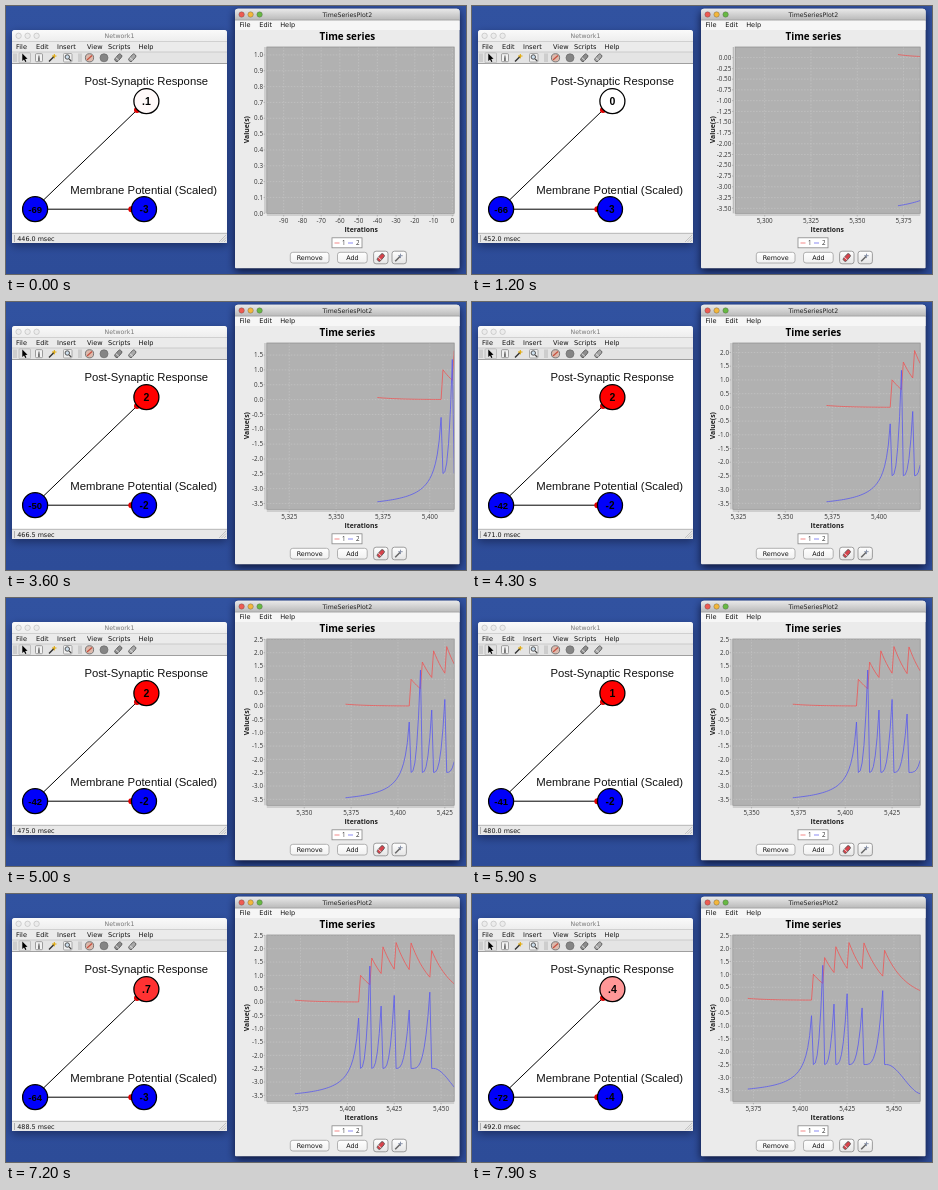
Write an HTML page with a canvas that moves like this. It is 460 px wide and 268 px high and loops after 8000 ms.

```html
<!DOCTYPE html>
<html lang="en">
<head>
<meta charset="utf-8">
<title>Spiking network</title>
<style>
html, body { margin: 0; width: 100%; height: 100%; overflow: hidden; background: #2f4f9c; }
canvas { display: block; width: 460px; height: 268px; }
</style>
</head>
<body>
<canvas id="stage"></canvas>
<script>
const W = 460, H = 268, LOOP = 8000, STEP = 100;
const cv = document.getElementById('stage');
const g = cv.getContext('2d');
const dpr = window.devicePixelRatio || 1;
cv.width = W * dpr;
cv.height = H * dpr;

const UI = '"DejaVu Sans", sans-serif';
const CHART = '"Open Sans", "Noto Sans", sans-serif';
const ARIAL = '"Liberation Sans", Arial, sans-serif';
const RED = '#ee5656', BLUE = '#5a5aee';

// Simulated msec at key times; two iterations pass per msec
const TIMES = [0, 2400, 3600, 5000, 5900, 7200, 7900];
const MSEC = [446, 458, 466.5, 475, 480, 488.5, 492];

// Spikes: iteration and peak of the scaled potential
const SPIKES = [[5406, -0.6], [5412, 1.35], [5418, -0.15], [5425, 0.25], [5433, -0.3], [5444, 0.37]];
const FIRST = 5372, LAST = 5464, RESET = -2.49, DECAY = 0.917;

function clock(t) {
  let k = 1;
  while (k < TIMES.length - 1 && t > TIMES[k]) k++;
  const u = Math.min(1, (t - TIMES[k - 1]) / (TIMES[k] - TIMES[k - 1]));
  return Math.round((MSEC[k - 1] + (MSEC[k] - MSEC[k - 1]) * u) * 2) / 2;
}
const iteration = msec => Math.min(LAST, msec * 2 + 4480);

function potential(i) {
  if (i <= SPIKES[0][0]) return -3.69 + 9.27 / (SPIKES[0][0] + 3 - i);
  for (let k = 1; k < SPIKES.length; k++) {
    const [end, peak] = SPIKES[k];
    if (i > end) continue;
    const start = SPIKES[k - 1][0] + 1, n = end - start;
    return RESET + (peak - RESET) * Math.pow((i - start) / n, 1.6 + 0.2 * n);
  }
  const u = Math.max(0, Math.min(1, (i - 5446) / 19));
  return RESET - 1.14 * u * u * (3 - 2 * u);
}

const blue = [], red = [];
for (let i = FIRST, v = 0.07; i <= LAST; i++) {
  if (i > FIRST) v = SPIKES.some(s => s[0] + 1 === i) ? v + 1 : v * DECAY;
  red.push(v);
  blue.push(potential(i));
}

// Drawing helpers
function text(s, x, y, size, family, opt = {}) {
  g.font = (opt.bold ? 'bold ' : '') + size + 'px ' + family;
  g.textAlign = opt.align || 'left';
  g.fillStyle = opt.color || '#111';
  g.fillText(s, x, y);
}
function box(x, y, w, h, fill) {
  g.fillStyle = fill;
  g.fillRect(x, y, w, h);
}
function line(x1, y1, x2, y2, color, width = 1) {
  g.strokeStyle = color;
  g.lineWidth = width;
  g.beginPath();
  g.moveTo(x1, y1);
  g.lineTo(x2, y2);
  g.stroke();
}
function disc(x, y, r, fill, stroke, width = 1) {
  g.beginPath();
  g.arc(x, y, r, 0, Math.PI * 2);
  g.fillStyle = fill;
  g.fill();
  if (stroke) {
    g.strokeStyle = stroke;
    g.lineWidth = width;
    g.stroke();
  }
}
function round(x, y, w, h, r, fill, stroke) {
  g.beginPath();
  g.roundRect(x, y, w, h, r);
  g.fillStyle = fill;
  g.fill();
  if (stroke) {
    g.strokeStyle = stroke;
    g.lineWidth = 0.8;
    g.stroke();
  }
}
function shade(y1, y2, a, b) {
  const gr = g.createLinearGradient(0, y1, 0, y2);
  gr.addColorStop(0, a);
  gr.addColorStop(1, b);
  return gr;
}
function poly(points, fill) {
  g.beginPath();
  points.forEach(([x, y]) => g.lineTo(x, y));
  g.closePath();
  g.fillStyle = fill;
  g.fill();
}
function frame(x, y, w, h, title, lights, tint, rim, depth) {
  g.save();
  g.shadowColor = `rgba(0,0,20,${depth})`;
  g.shadowBlur = 8 * dpr;
  g.shadowOffsetY = 3 * dpr;
  round(x, y, w, h, [3, 3, 1, 1], '#ebebeb');
  g.restore();
  round(x, y, w, 11.5, [3, 3, 0, 0], shade(y, y + 11.5, tint[0], tint[1]));
  line(x, y + 11.5, x + w, y + 11.5, tint[2], 0.7);
  lights.forEach((c, k) => disc(x + 6.6 + k * 9, y + 5.8, 2.7, c, rim, 0.6));
  text(title, x + w / 2, y + 8.1, 6.2, UI, { align: 'center', color: tint[3] });
}
function menu(items, y) {
  items.forEach(([s, x]) => text(s, x, y, 6.55, UI));
}
function eraser(x, y, color) {
  g.save();
  g.translate(x, y);
  g.rotate(-0.85);
  round(-4.2, -2, 8.4, 4, 1.6, color, '#555');
  line(-1.5, -2, -1.5, 2, '#eee', 0.8);
  g.restore();
}
function wand(x, y, stick, star) {
  line(x - 3.5, y + 3.5, x + 1.5, y - 1.5, stick, 1.5);
  line(x - 0.5, y - 2, x + 4, y - 2, star, 1);
  line(x + 1.8, y - 4, x + 1.8, y + 0.4, star, 1);
}

function toolbar() {
  box(6, 46, 215, 11.5, '#e4e4e4');
  line(6, 46, 221, 46, '#bdbdbd', 0.7);
  line(6, 57.5, 221, 57.5, '#8d8d8d', 0.8);
  for (const x of [8, 10, 73, 75]) line(x, 47.5, x, 56, '#a5a5a5', 0.7);
  round(13, 46.8, 11.5, 10, 1, '#e0e0e0', '#b5b5b5');
  poly([[16.3, 47.5], [16.3, 55], [18, 53.5], [19.3, 56], [20.4, 55.4], [19.2, 53], [21.5, 52.8]], '#000');
  round(29.5, 47.7, 7, 8, 1, '#f2f2f2', '#888');
  text('i', 33, 54.5, 7, UI, { bold: true, align: 'center', color: '#333' });
  wand(46.5, 52, '#333', '#e2a800');
  round(57.5, 47.5, 8.5, 8.5, 1, '#efefef', '#999');
  disc(61.3, 51, 2.2, '#cfe0ee', '#444', 0.9);
  line(63, 52.8, 65.2, 55, '#444', 1.2);
  disc(83.5, 51.8, 4.1, '#dcb9ac', '#6f6f6f', 0.9);
  line(81, 54, 86, 49.5, '#c7503f', 1.2);
  disc(98, 51.8, 4, '#858585', '#6b6b6b', 0.7);
  eraser(112.3, 51.8, '#8d8d8d');
  eraser(126.3, 51.8, '#a9a9a9');
}

function label(v) {
  if (Math.abs(v) >= 0.95) return String(Math.round(v));
  const s = v.toFixed(1).replace('0.', '.');
  return s === '.0' || s === '-.0' ? '0' : s;
}
function node(x, y, fill, s, size) {
  disc(x, y, 12.5, fill, '#000', 1.3);
  text(s, x, y + 3.8, size, ARIAL, { bold: true, align: 'center', color: '#000' });
}

function network(msec) {
  frame(6, 24, 215, 213, 'Network1', ['#ececec', '#ececec', '#ececec'],
    ['#fafafa', '#ededed', '#c4c4c4', '#777'], '#b9b9b9', 0.4);
  menu([['File', 10], ['Edit', 30], ['Insert', 51], ['View', 81], ['Scripts', 102], ['Help', 132.5]], 43);
  toolbar();
  box(6, 58, 215, 169, '#fff');

  const k = iteration(msec) - FIRST;
  const v = red[k], p = blue[k];
  const pale = Math.round(255 * (1 - Math.max(0, Math.min(1, (v - 0.05) * 1.27))));

  text('Post-Synaptic Response', 78.4, 79, 11.3, ARIAL);
  text('Membrane Potential (Scaled)', 64.2, 187.5, 11.35, ARIAL);
  line(37, 194.5, 131, 104, '#000', 1);
  line(41, 203.2, 126, 203.2, '#000', 1);
  disc(131, 104, 3, '#e00000');
  disc(125.3, 203.2, 3, '#e00000');
  node(140.4, 95.2, `rgb(255,${pale},${pale})`, label(v), 10.5);
  node(29.1, 203.2, '#0000fa', String(Math.round(p * 20)), 9.5);
  node(138, 203.2, '#0000fa', label(p), 10);

  box(6, 227, 215, 10, '#e8e8e8');
  line(6, 227.3, 221, 227.3, '#aaa', 0.8);
  line(8.5, 229, 8.5, 236, '#999', 0.7);
  text(msec.toFixed(1) + ' msec', 11.3, 234.6, 6.4, UI);
  for (let n = 0; n < 3; n++) line(213 + n * 2.5, 236, 220, 229 + n * 2.5, '#aaa', 0.6);
}

const TOP = 41, BOTTOM = 207.3, EDGE = 448.2;

function chart(msec, empty) {
  let lo = 0, hi = 1.05, right = 1, unit = 0.1, xUnit = 10, count = 0;
  const h = BOTTOM - TOP;
  if (!empty) {
    right = iteration(msec);
    count = right - FIRST + 1;
    const all = red.slice(0, count).concat(blue.slice(0, count));
    const min = Math.min(...all), max = Math.max(...all), pad = (max - min) * 0.05;
    lo = min - pad;
    hi = max + pad;
    unit = 0.25 * h / (hi - lo) >= 9 ? 0.25 : 0.5;
    xUnit = 25;
  }
  // Longer tick labels push the plot's left side inwards
  const digits = unit === 0.25 ? 2 : 1;
  const x0 = 258.5 + digits * 2.3, w = EDGE - x0, left = right - 100;
  const px = i => x0 + (i - left) / 100 * w;
  const py = v => TOP + (hi - v) / (hi - lo) * h;

  box(x0, TOP, w, h, '#b1b1b1');
  line(x0 - 1.8, TOP, x0 - 1.8, BOTTOM, '#999', 0.7);
  line(x0, 209, EDGE, 209, '#999', 0.7);

  for (let k = Math.ceil(lo / unit - 1e-9); k * unit <= hi; k++) {
    const y = py(k * unit);
    g.setLineDash([1.5, 1.5]);
    line(x0, y, EDGE, y, '#cbcbcb', 0.5);
    g.setLineDash([]);
    line(x0 - 3.2, y, x0 - 1.8, y, '#999', 0.6);
    text((k * unit).toFixed(digits), x0 - 3.8, y + 2.2, 6.3, CHART, { align: 'right', color: '#333' });
  }
  for (let i = Math.ceil(left / xUnit) * xUnit; i <= right; i += xUnit) {
    const x = px(i);
    g.setLineDash([1.5, 1.5]);
    line(x, TOP, x, BOTTOM, '#cbcbcb', 0.5);
    g.setLineDash([]);
    line(x, 209, x, 210.4, '#999', 0.6);
    text(i.toLocaleString('en-US'), x, 217, 6.3, CHART, { align: 'center', color: '#333' });
  }

  g.save();
  g.beginPath();
  g.rect(x0, TOP, w, h);
  g.clip();
  for (const [data, color] of [[red, RED], [blue, BLUE]]) {
    g.beginPath();
    for (let k = 0; k < count; k++) g.lineTo(px(FIRST + k), py(data[k]));
    g.strokeStyle = color;
    g.lineWidth = 0.8;
    g.lineJoin = 'bevel';
    g.stroke();
  }
  g.restore();
  g.strokeStyle = '#8c8c8c';
  g.lineWidth = 0.7;
  g.strokeRect(x0, TOP, w, h);
}

function button(s, x, w) {
  round(x, 246.3, w, 10.7, 2.5, shade(246, 257, '#fff', '#f0f0f0'), '#a0a0a0');
  text(s, x + w / 2, 254.1, 6.4, UI, { align: 'center' });
}

function plotWindow(msec, empty) {
  frame(229, 2.7, 224.6, 259.6, 'TimeSeriesPlot2', ['#ee5b52', '#f3b73c', '#68b944'],
    ['#e9e9e9', '#b9b9b9', '#888', '#222'], 'rgba(70,70,70,.55)', 0.75);
  box(229, 14.6, 224.6, 9.4, '#f6f6f6');
  menu([['File', 233.5], ['Edit', 253.3], ['Help', 274.2]], 21.2);
  text('Time series', 341.3, 34.2, 9.85, CHART, { bold: true, align: 'center', color: '#000' });
  chart(msec, empty);
  text('Iterations', 355.2, 226, 6.8, CHART, { bold: true, align: 'center', color: '#222' });
  g.save();
  g.translate(243, 123.7);
  g.rotate(-Math.PI / 2);
  text('Value(s)', 0, 0, 6.9, CHART, { bold: true, align: 'center', color: '#222' });
  g.restore();

  g.strokeStyle = '#888';
  g.lineWidth = 0.8;
  box(326, 231.8, 30, 10, '#fff');
  g.strokeRect(326, 231.8, 30, 10);
  line(328.5, 237, 333.5, 237, RED, 0.7);
  text('1', 336, 239.3, 6.2, CHART, { color: '#333' });
  line(342, 237, 347, 237, BLUE, 0.7);
  text('2', 350, 239.3, 6.2, CHART, { color: '#333' });

  button('Remove', 284.3, 38.7);
  button('Add', 331.5, 29.7);
  for (const x of [367.6, 386]) round(x, 245.2, 14.4, 12.6, 2.5, shade(245, 258, '#fff', '#e4e4e4'), '#888');
  eraser(374.8, 251.5, '#d8434b');
  wand(392.7, 251.7, '#666', '#8a94aa');
}

function draw(t) {
  const msec = clock(t);
  g.setTransform(dpr, 0, 0, dpr, 0, 0);
  box(0, 0, W, H, shade(0, H, '#3152a0', '#2d4c98'));
  network(msec);
  plotWindow(msec, t < STEP);
}

const start = performance.now();
function tick() {
  const t = (performance.now() - start) % LOOP;
  draw(Math.floor(t / STEP) * STEP);
  requestAnimationFrame(tick);
}
draw(0);
requestAnimationFrame(tick);
</script>
</body>
</html>
```
